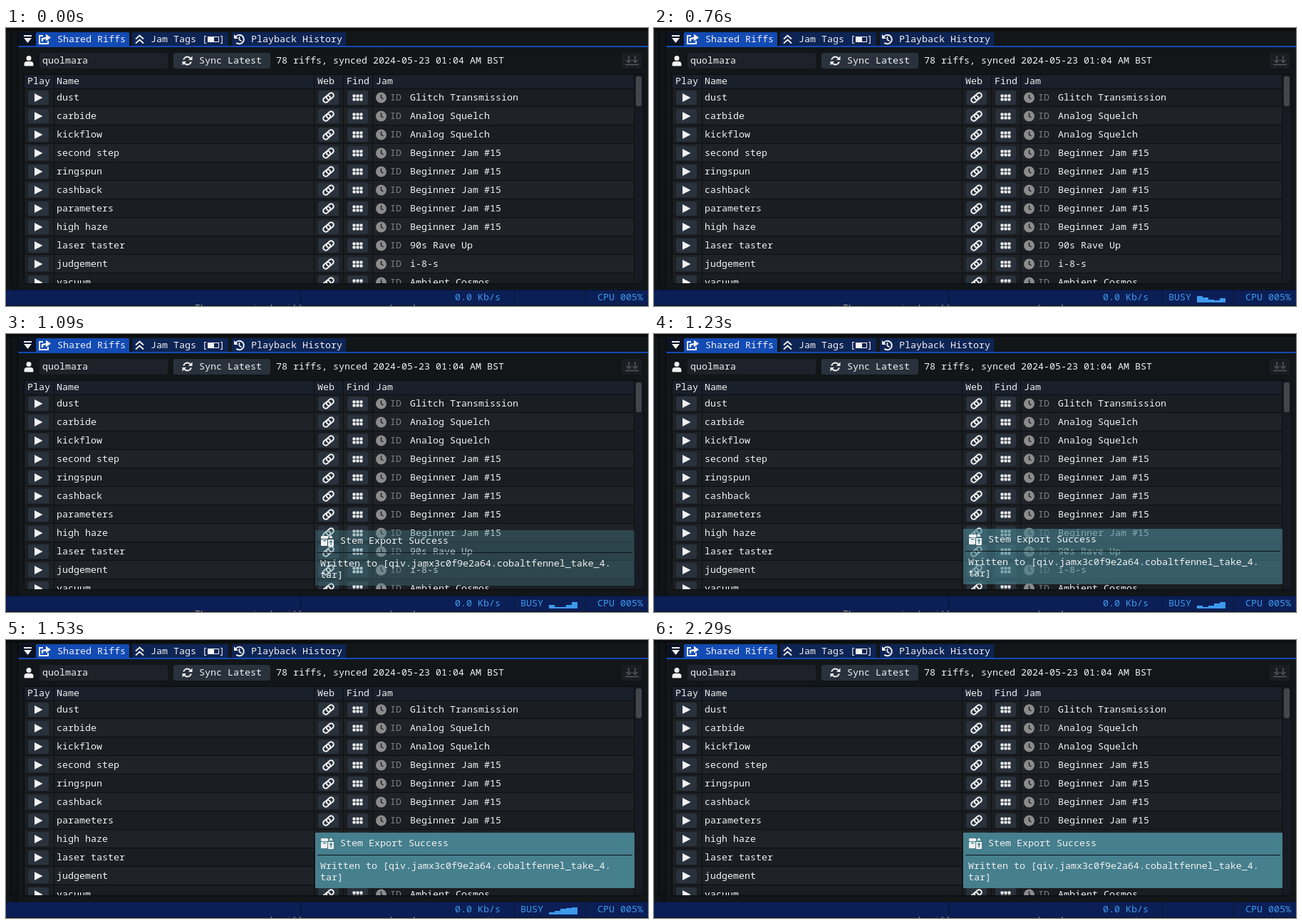
An HTML page with a canvas for the animation above (3290 ms loop, 901 px wide and 391 px high).

```html
<!DOCTYPE html>
<html lang="en">
<head>
<meta charset="utf-8">
<title>Shared riffs</title>
<style>
html, body { margin: 0; width: 100%; height: 100%; overflow: hidden; background: #101417; }
canvas { display: block; }
</style>
</head>
<body>
<canvas id="stage" width="901" height="391"></canvas>
<script>
const ctx = document.getElementById('stage').getContext('2d');
const LOOP = 3290;
const BUSY_START = 330, BUSY_END = 2290;
const TOAST_START = 930, TOAST_END = 1430;
const WHITE = '#f1f1f1', BUTTON = '#29323c', BLUE = '#3d9aed';

const riffs = [
  ['dust', 'Glitch Transmission'], ['carbide', 'Analog Squelch'],
  ['kickflow', 'Analog Squelch'], ['second step', 'Beginner Jam #15'],
  ['ringspun', 'Beginner Jam #15'], ['cashback', 'Beginner Jam #15'],
  ['parameters', 'Beginner Jam #15'], ['high haze', 'Beginner Jam #15'],
  ['laser taster', '90s Rave Up'], ['judgement', 'i-8-s'], ['vacuum', 'Ambient Cosmos']
];

// Bar heights of the activity meter: time, then five columns
const meterPoses = [
  [330, 2, 3, 5, 7, 9], [760, 9, 7, 4, 3, 6], [1090, 5, 2, 2, 5, 9],
  [1230, 4, 2, 4, 7, 9], [1530, 3, 5, 8, 9, 10], [1760, 9, 9, 7, 5, 3],
  [1990, 3, 1, 1, 1, 1], [2290, 1, 2, 3, 5, 7]
];

function box(x, y, w, h, color, radius = 0) {
  ctx.fillStyle = color;
  ctx.beginPath();
  ctx.roundRect(x, y, w, h, radius);
  ctx.fill();
}

function text(value, x, y, color = WHITE) {
  ctx.fillStyle = color;
  ctx.fillText(value, x, y);
}

function polygon(color, ...points) {
  ctx.fillStyle = color;
  ctx.beginPath();
  points.forEach(([x, y]) => ctx.lineTo(x, y));
  ctx.fill();
}

function line(color, width, ...points) {
  ctx.strokeStyle = color;
  ctx.lineWidth = width;
  ctx.beginPath();
  points.forEach(([x, y]) => ctx.lineTo(x, y));
  ctx.stroke();
}

function arc(x, y, r, from, to, color = WHITE, width = 2) {
  ctx.strokeStyle = color;
  ctx.lineWidth = width;
  ctx.beginPath();
  ctx.arc(x, y, r, from, to);
  ctx.stroke();
}

function disc(x, y, r, color) {
  ctx.fillStyle = color;
  ctx.beginPath();
  ctx.arc(x, y, r, 0, 7);
  ctx.fill();
}

function at(x, y, angle, draw) {
  ctx.save();
  ctx.translate(x, y);
  ctx.rotate(angle);
  draw();
  ctx.restore();
}

function linkIcon(x, y) {
  at(x, y, -0.7, () => {
    ctx.strokeStyle = WHITE;
    ctx.lineWidth = 2;
    for (const left of [-8.5, -2.5]) {
      ctx.beginPath();
      ctx.roundRect(left, -3.5, 11, 7, 3.5);
      ctx.stroke();
    }
  });
}

function gripIcon(x, y) {
  for (const dx of [-7, -2, 3])
    for (const dy of [-4.5, 0.5]) box(x + dx, y + dy, 4, 4, WHITE, 1);
}

function syncIcon(x, y) {
  for (const angle of [0, Math.PI]) at(x, y, angle, () => {
    arc(0, 0, 5.5, 3.4, 5.8);
    polygon(WHITE, [7, -6.5], [7, -1], [1.5, -1]);
  });
}

function drawTabs() {
  box(0, 0, 901, 4, '#0a0c0e');
  box(18, 6, 24, 19, '#0b1222');
  box(42, 6, 131, 20, '#134bb5', 2);
  box(177, 6, 135, 19, '#0e2454', 2);
  box(317, 6, 160, 19, '#0e2454', 2);
  box(17, 25, 884, 2, '#134bb5');

  box(25, 10, 11, 2, WHITE);
  polygon(WHITE, [25, 14], [36, 14], [30.5, 21]);

  line(WHITE, 2, [52, 11], [47, 11], [47, 22], [59, 22], [59, 18]);
  line(WHITE, 2.5, [51, 19], [51, 15], [57, 14]);
  polygon(WHITE, [56, 8.5], [63, 13.5], [56, 18.5]);
  text('Shared Riffs', 72, 20);

  for (const y of [15.5, 21.5]) line(WHITE, 2, [182, y], [187.5, y - 5], [193, y]);
  text('Jam Tags [  ]', 203, 20);
  box(283, 12, 8, 8, WHITE);
  ctx.strokeStyle = WHITE;
  ctx.lineWidth = 1;
  ctx.strokeRect(291.5, 12.5, 7, 7);

  arc(327.5, 16, 6.3, -2.6, 2.3);
  polygon(WHITE, [320, 9], [320, 15], [326, 15]);
  line(WHITE, 1.7, [327.5, 12], [327.5, 16.5], [330.5, 18.5]);
  text('Playback History', 344, 20);
}

function drawToolbar() {
  disc(32, 42.5, 3.5, WHITE);
  box(25.5, 47, 13, 6.5, WHITE, [4, 4, 1, 1]);
  box(47, 35, 180, 22, '#1e2129', 3);
  text('quolmara', 51, 50);
  box(235, 35, 136, 22, BUTTON, 3);
  syncIcon(254.5, 46);
  text('Sync Latest', 271, 50);
  text('78 riffs, synced 2024-05-23 01:04 AM BST', 379, 50);
  box(864, 35, 28, 22, '#1a1e23', 3);
  for (const x of [874, 883]) {
    line('#54585c', 1.5, [x, 39], [x, 48]);
    line('#54585c', 1.5, [x - 3.5, 45], [x, 48.5], [x + 3.5, 45]);
  }
  line('#54585c', 1.5, [869, 51.5], [888, 51.5]);
}

function drawRow([name, jam], index) {
  const y = 98 + 26 * index;
  box(26, y - 13, 856, 26, index % 2 ? '#1f2226' : '#1a1d21');
  box(26, y + 12, 856, 1, '#0d0f11');
  for (const x of [31, 438, 479]) box(x, y - 10, 29, 20, BUTTON, 3);
  polygon(WHITE, [40, y - 6], [51.5, y], [40, y + 6]);
  text(name, 71, y + 4);
  linkIcon(452.5, y);
  gripIcon(493.5, y);
  disc(526.5, y, 7.5, '#8c8c8c');
  line('#1c1f23', 1.5, [526.5, y - 4.5], [526.5, y], [529.5, y + 2]);
  text('ID', 539, y + 4, '#7d7f82');
  text(jam, 567, y + 4);
}

function drawTable() {
  box(25, 65, 870, 295, '#0a0c0e');
  ctx.save();
  ctx.beginPath();
  ctx.rect(26, 66, 868, 293);
  ctx.clip();
  riffs.forEach(drawRow);
  box(26, 66, 856, 19, '#191f2b');
  box(882, 66, 12, 293, '#171a22');
  box(26, 85, 856, 1, '#0d0f11');
  for (const x of [67, 432, 473, 514, 881]) box(x, 66, 1, 293, '#0d0f11');
  [['Play', 30], ['Name', 71], ['Web', 437], ['Find', 478], ['Jam', 519]]
    .forEach(([label, x]) => text(label, x, 79));
  box(884, 68, 8, 42, '#43464b', 3);
  ctx.restore();
}

function drawToast(time) {
  if (time < TOAST_START) return;
  const shown = Math.min(1, (time - TOAST_START + 50) / (TOAST_END - TOAST_START + 50));
  const top = 271 + Math.round((1 - shown) * 8);
  ctx.globalAlpha = shown;
  box(434, top, 448, 78, '#467f8d', 1);
  ctx.globalAlpha = 1;
  box(437, top + 31, 442, 1, '#0d1417');

  box(442, top + 8, 10, 4, WHITE, 1);
  box(442, top + 13, 9, 9, WHITE, 1);
  box(445, top + 14, 4, 1.5, '#467f8d');
  box(452, top + 13, 8, 10, WHITE, 1);
  polygon(WHITE, [453, top + 11], [456, top + 7], [459, top + 11]);
  line('#467f8d', 1.4, [456, top + 21], [456, top + 15]);
  line('#467f8d', 1.4, [454, top + 17], [456, top + 15], [458, top + 17]);

  text('Stem Export Success', 469, top + 19);
  text('Written to [qiv.jamx3c0f9e2a64.cobaltfennel_take_4.', 441, top + 51);
  text('tar]', 441, top + 67);
}

function drawMeter(time) {
  const next = meterPoses.findIndex(pose => pose[0] > time);
  const a = meterPoses[next - 1], b = meterPoses[next];
  const mix = (time - a[0]) / (b[0] - a[0]);
  for (let i = 1; i <= 5; i++) {
    const height = Math.round(a[i] + (b[i] - a[i]) * mix);
    box(754 + 8 * i, 386 - height, 8, height, BLUE);
  }
}

function drawStatus(time) {
  box(0, 368, 901, 23, '#0b1f56');
  box(0, 368, 901, 1, '#071230');
  for (const x of [413, 713, 813]) box(x, 369, 1, 21, '#07122f');
  text('0.0 Kb/s', 630, 383, BLUE);
  text('CPU 005%', 830, 383, BLUE);
  if (time >= BUSY_START && time < BUSY_END) {
    text('BUSY', 722, 383, BLUE);
    drawMeter(time);
  }

  // Tops of a text line cut off by the stage edge
  box(0, 390, 901, 1, '#0d1014');
  ctx.save();
  ctx.beginPath();
  ctx.rect(time < 1460 ? 265 : 350, 389, 380, 2);
  ctx.clip();
  text('These are just riffs you can export - from any session', 265, 398, '#8b929c');
  ctx.restore();
}

function draw(time) {
  ctx.font = '13.333px "Noto Sans Mono", "DejaVu Sans Mono", monospace';
  box(0, 0, 901, 391, '#121619');
  box(6, 0, 1, 360, '#050607');
  box(0, 359, 7, 1, '#050607');
  box(7, 0, 9, 368, '#101316');
  box(16, 0, 1, 368, '#050607');
  drawTabs();
  drawToolbar();
  drawTable();
  drawToast(time);
  drawStatus(time);
}

const start = performance.now();
function tick() {
  draw((performance.now() - start) % LOOP);
  requestAnimationFrame(tick);
}
tick();
</script>
</body>
</html>
```
